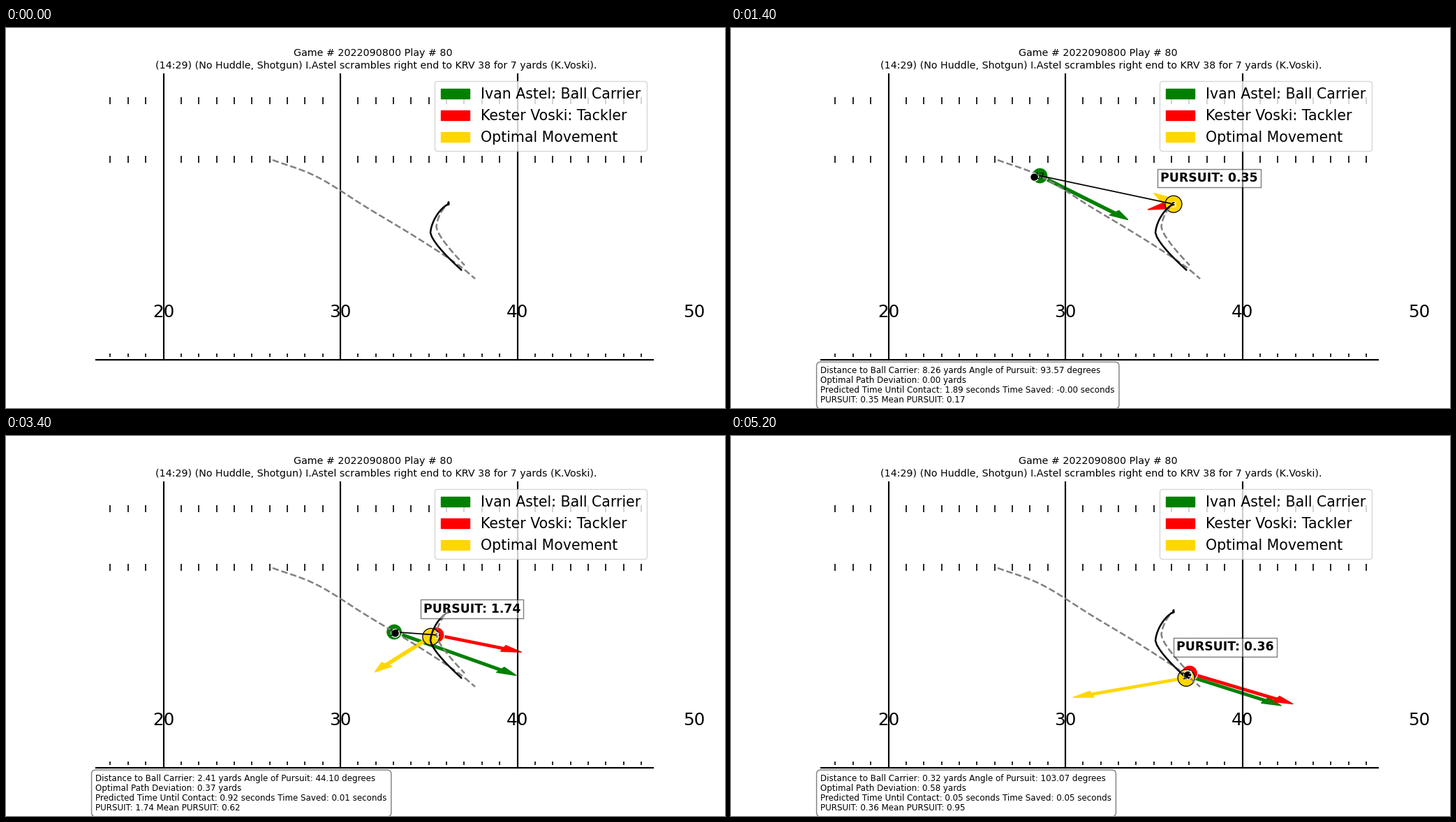
Write a matplotlib script that moves like this. It is 1030 px wide and 544 px high and loops after 5400 ms.

```python
import matplotlib.pyplot as plt
import numpy as np
from matplotlib.animation import FuncAnimation
from matplotlib.patches import Circle, FancyArrow, Patch
from matplotlib.transforms import Affine2D

W, H, DPI = 1030, 544, 100
FRAMES, STEP = 27, 200
LAST = FRAMES - 1
YARD = np.array([25.35, 12.2])    # pixels per yard
LEFT_YARD, LEFT_X = 20, 225.5
SIDELINE = 475
PT = 72 / DPI                     # pixels to points

plt.rcParams["font.family"] = "DejaVu Sans"


# ---- motion ----

def ease(k, start, end):
    t = np.clip((k - start) / (end - start), 0, 1)
    return t * t * (3 - 2 * t)


def carrier(k):
    """Runs a shallow curve through a few waypoints."""
    keys = np.array([1, 7, 14, 20, 26, 29])
    points = np.array([(382, 189), (442.5, 211.5), (518.5, 258),
                       (593, 303), (653, 343), (672, 359)])
    slopes = np.gradient(points, keys, axis=0)
    i = min(np.searchsorted(keys, k, "right"), len(keys) - 1) - 1
    span = keys[i + 1] - keys[i]
    t = (k - keys[i]) / span
    blend = t * t * (3 - 2 * t)
    return (points[i] + (points[i + 1] - points[i]) * blend
            + span * t * (1 - t) * ((1 - t) * slopes[i] - t * slopes[i + 1]))


def swerve(k, turn, x, left, right, drop):
    """Waits, then swings left until `turn` and back right while dropping."""
    run = max(k - 7, 0)
    side = max(k, 8) - turn
    hook = 1.5 * np.cos(k) * np.exp(-run)
    return np.array([x + (right if side > 0 else left) * abs(side) ** 1.5,
                     251 + drop * run ** 1.5 + hook])


def tackler(k):
    return swerve(k, 17, 616.5, 0.65, 1.5, 1.07)


def optimal(k):
    return swerve(k, 18, 608, 0.82, 1.95, 1.15)


def ball(k):
    return carrier(k) + (-8 + 9.5 * ease(k, 7, 14), 2 - 3 * ease(k, 16, 26))


def carrier_aim(k):
    return np.array([175 - 125 * ((k - 17) / 16) ** 2,
                     63 - 20 * (k / LAST) ** 8])


def tackler_aim(k):
    """Turns from up to down, then swings to the right."""
    t = np.clip((k - 4) / 10, 0, 1)
    down = np.array([-2 - 35 * ease(k, 4, 7) + 19 * ease(k, 9, 14),
                     -29 + 89 * (1 - (1 - t) ** 1.5)])
    right = np.array([148, 18 + 26 * ease(k, 19, 26)])
    return down + (right - down) * ease(k, 14, 18)


def optimal_aim(k):
    return (np.array([48, 17])
            + np.array([-72, -35]) * ease(k, 4, 7)
            + np.array([-89, 46]) * ease(k, 6, 13.5)
            + np.array([65, 45]) * ease(k, 14, 20)
            + np.array([-114, -45]) * ease(k, 20, 26))


def yards_between(a, b):
    return np.hypot(*((a - b) / YARD))


# ---- read-outs ----

KEYS = [4, 7, 11, 14, 20, 26]


def angle(k):
    return np.interp(k, KEYS, [145.89, 93.57, 60.82, 55.37, 32.83, 103.07])


def saved(k):
    return np.interp(k, KEYS, [-0.02, -0.002, 0.002, 0.01, 0.02, 0.05])


def pursuit(k):
    return np.interp(k, KEYS, [0.10, 0.35, 0.67, 0.99, 2.49, 0.36])


def report(k):
    mean = np.mean([pursuit(n) for n in range(1, k + 1)])
    return (f"Distance to Ball Carrier: "
            f"{yards_between(carrier(k), tackler(k)):.2f} yards "
            f"Angle of Pursuit: {angle(k):.2f} degrees\n"
            f"Optimal Path Deviation: "
            f"{yards_between(optimal(k), tackler(k)):.2f} yards\n"
            f"Predicted Time Until Contact: "
            f"{0.05 + 0.0968 * (LAST - k):.2f} seconds "
            f"Time Saved: {saved(k):.2f} seconds\n"
            f"PURSUIT: {pursuit(k):.2f} Mean PURSUIT: {mean:.2f}")


# ---- drawing ----

fig = plt.figure(figsize=(W / DPI, H / DPI), dpi=DPI, facecolor="white")
ax = fig.add_axes([0, 0, 1, 1])
ax.set_xlim(0, W)
ax.set_ylim(H, 0)
ax.axis("off")
in_yards = Affine2D().scale(*YARD) + ax.transData


def yard_x(yard):
    return LEFT_X + (yard - LEFT_YARD) * YARD[0]


def label(x, y, text, px, **kw):
    return ax.text(x, y, text, fontsize=px * PT, **kw)


def draw_field():
    for yard in (20, 30, 40, 50):
        x = yard_x(yard)
        if yard < 50:
            ax.plot([x, x], [66, SIDELINE], color="black", lw=1.54, zorder=2)
        label(x, 413.5, str(yard), 24.65, ha="center", zorder=3)
    ax.plot([129, 927], [SIDELINE] * 2, color="black", lw=1.54, zorder=2)
    marks = [yard_x(n) for n in range(17, 48) if n % 10]
    for top, bottom in ((99, 109), (183, 193), (466, 471)):
        ax.vlines(marks, top, bottom, color="black", lw=1.2, zorder=2)

    label(525.5, 40, "Game # 2022090800 Play # 80", 14.26, ha="center")
    label(530, 58, "(14:29) (No Huddle, Shotgun) I.Astel scrambles right end "
          "to KRV 38 for 7 yards (K.Voski).", 14.26, ha="center")

    ax.legend(handles=[Patch(color="green", label="Ivan Astel: Ball Carrier"),
                       Patch(color="red", label="Kester Voski: Tackler"),
                       Patch(color="gold", label="Optimal Movement")],
              fontsize=20.54 * PT, loc="upper left", borderaxespad=0,
              borderpad=0.44, labelspacing=0.54,
              bbox_to_anchor=(613.5, 76), bbox_transform=ax.transData)


def draw_path(track, last, **kw):
    x, y = np.array([track(k) for k in range(1, last + 1)]).T
    ax.plot(x, y, lw=1.8, zorder=2, **kw)


def arrow(pos, aim, color):
    return ax.add_patch(FancyArrow(
        *(pos / YARD), *(aim / YARD), width=0.25, head_width=0.75,
        head_length=1.125, length_includes_head=True, color=color, lw=1,
        transform=in_yards, zorder=1))


def dot(pos, radius, color, edge="white", z=1.1):
    return ax.add_patch(Circle(pos, radius, facecolor=color, edgecolor=edge,
                               lw=0.9, zorder=z))


def number(pos, text, color):
    return label(*pos, text, 11.88, color=color, ha="center",
                 va="center_baseline", zorder=3)


def box(style):
    return dict(boxstyle=style, facecolor="white", edgecolor="black",
                alpha=0.5, lw=1.03)


draw_field()
draw_path(carrier, 29, color="gray", ls="--")
draw_path(tackler, LAST, color="gray", ls="--")
draw_path(optimal, LAST, color="black")

moving = []


def draw(k):
    while moving:
        moving.pop().remove()
    if k == 0:
        return []

    c, t, o = carrier(k), tackler(k), optimal(k)
    moving.extend([
        arrow(c, carrier_aim(k), "green"),
        arrow(t, tackler_aim(k), "red"),
        arrow(o, optimal_aim(k), "gold"),
        dot(c, 11.5, "green"),
        dot(t, 11.5, "red"),
        dot(o, 12, "gold", "black"),
        dot(ball(k), 5.8, "black", z=2.6),
        number(c, "17", "black"),
        number(t, "3", "white"),
        label(t[0] - 18.7, t[1] - 46.2, f"PURSUIT: {pursuit(k):.2f}", 17.2,
              weight="bold", va="top", zorder=3, bbox=box("square,pad=0.25")),
        label(128.5, 484, report(k), 11.88, va="top", linespacing=1.1,
              zorder=3, bbox=box("round,pad=0.5")),
    ])
    moving.extend(ax.plot([c[0], t[0]], [c[1], t[1]], color="black",
                          lw=1.25, zorder=2))
    return moving


anim = FuncAnimation(fig, draw, frames=FRAMES, interval=STEP, repeat=True,
                     init_func=lambda: draw(0), blit=False)
plt.show()
```
